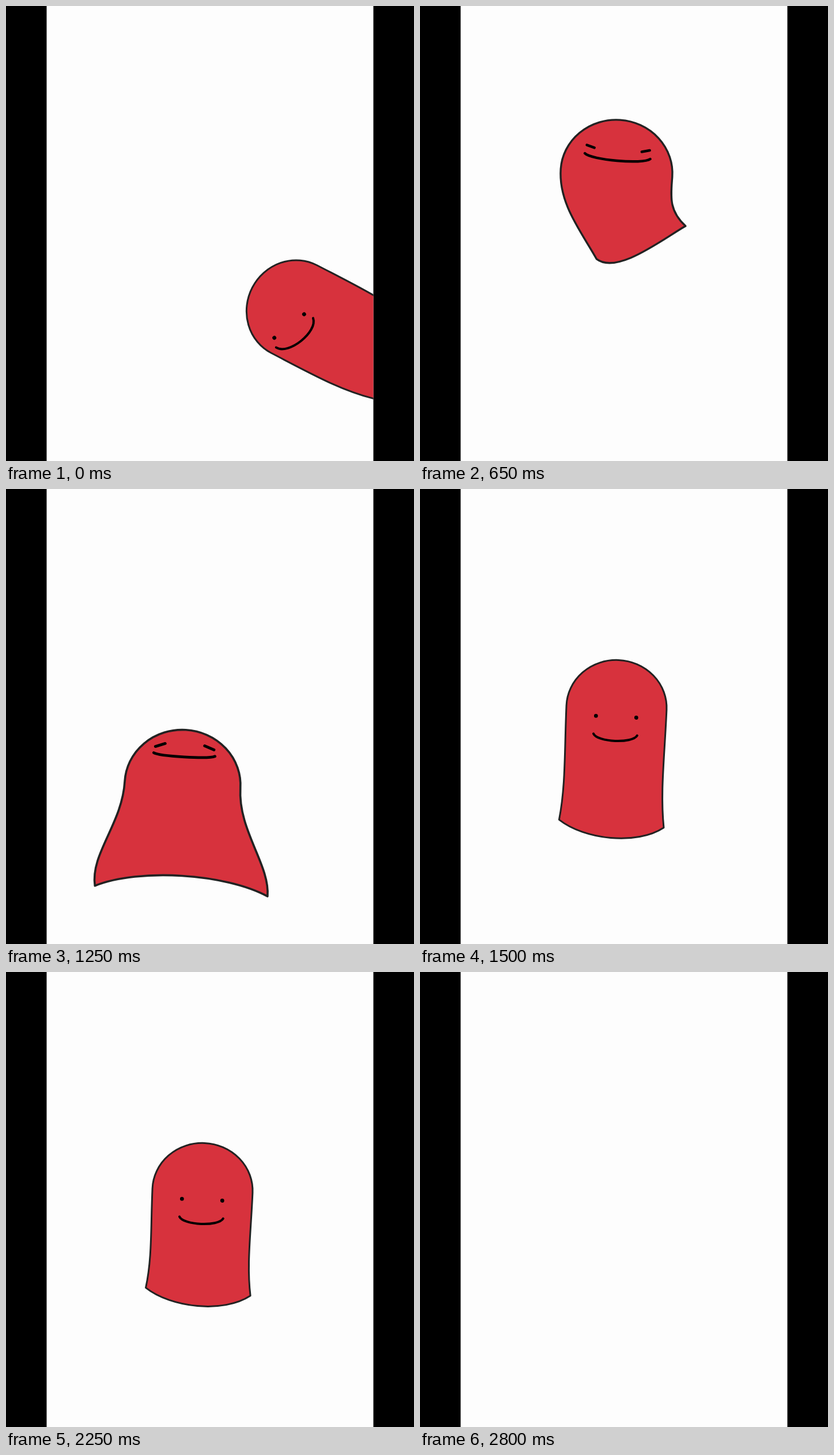
Animation of 708x791 px, one loop 2.85 s. Source, as an HTML page with a canvas:

```html
<!DOCTYPE html>
<html lang="en">
<head>
<meta charset="utf-8">
<title>Red blob</title>
<style>
  html, body { margin: 0; height: 100%; overflow: hidden; background: #000; }
  canvas { display: block; }
</style>
</head>
<body>
<canvas width="708" height="791"></canvas>
<script>
const ctx = document.querySelector('canvas').getContext('2d');
const LOOP = 2850, STEP = 50, GONE = 2800;
const EDGE = 70.5, PAPER = 567;

// Head centre, radius and tilt (degrees); the skirt's length, waist and hem;
// the face's offset and turn against the head; eye spacing, length and slant; the smile.
const stand = {
  x: 341, y: 380, r: 87, tilt: 2.5, ink: 4,
  len: 202, waist: 82, hem: 91, shift: 0, skew: 3, bulge: 33,
  faceX: 0, faceY: 16, turn: 0,
  eyes: 35, eyeLen: 0, slant: 0, gap: 31, smile: 38, depth: 11
};
const enter = { ...stand, x: 500, y: 527, r: 86, tilt: -62.5, len: 195, waist: 88, hem: 74, skew: 0, bulge: 40,
  faceX: -30, faceY: 6, turn: 24, eyes: 33, gap: 15, smile: 41, depth: 18 };
const hop = { ...stand, y: 290, r: 97, tilt: 4, ink: 4.5, len: 118, waist: 74, hem: 75, shift: 51, skew: -34, bulge: 25,
  faceY: -42, turn: 1, eyes: 48, eyeLen: 14, slant: 15, gap: 13, smile: 57, depth: 8 };
const drop = { ...stand, x: 311, y: 463, r: 103, tilt: 3.5, ink: 5, len: 150, waist: 170, hem: 161, shift: 10, skew: 0, bulge: -48,
  faceY: -82, eyes: 44, eyeLen: 21, slant: -24, gap: 11, smile: 56, depth: 3 };
const twirl = { ...stand, x: 340, y: 384, r: 86, tilt: 5, ink: 3, len: 133, waist: 95, hem: 138, shift: 5, skew: 4, bulge: 48,
  faceY: 12, gap: 20, smile: 42, depth: 13 };
const leap = { ...stand, x: 383, y: 330, r: 105, tilt: 33.7, ink: 5.5, len: 308, waist: 5, hem: 31, shift: 22, skew: -12, bulge: 50,
  faceX: 28, faceY: 132, turn: -12, eyes: 30, eyeLen: 24, slant: 44, gap: 19, smile: 30, depth: 57 };
const rest = { ...stand, len: 176 };

const keys = [
  [0, enter], [550, { ...hop, y: 293 }], [650, hop], [700, hop],
  [900, { ...drop, x: 322, y: 388, hem: 185 }], [1050, drop],
  [1200, { ...drop, x: 300, y: 540, len: 180 }],
  [1400, { ...stand, y: 374, len: 210 }], [1500, stand], [1600, stand],
  [1650, rest], [1750, rest],
  [1850, { ...twirl, hem: 225, len: 118 }], [1950, { ...twirl, hem: 215, skew: -40 }],
  [2050, twirl], [2150, { ...twirl, hem: 90, len: 160 }], [2250, rest], [2350, rest],
  [2500, { ...twirl, x: 285, y: 450, hem: 200, ink: 4 }],
  [2600, leap], [2650, { ...leap, x: 423, y: 240 }], [GONE, { ...leap, x: 680, y: -310 }]
];

function poseAt(t) {
  const i = keys.findIndex(key => key[0] > t);
  const [t0, from] = keys[i - 1], [t1, to] = keys[i];
  const u = (t - t0) / (t1 - t0), k = u * u * (3 - 2 * u);
  return Object.fromEntries(Object.keys(from).map(name => [name, from[name] + (to[name] - from[name]) * k]));
}

const radians = degrees => degrees * Math.PI / 180;

function drawBody({ r, len, waist, hem, shift, skew, bulge, ink }) {
  const left = len - skew, right = len + skew, pull = shift * .4;
  ctx.beginPath();
  ctx.moveTo(shift - hem, left);
  ctx.bezierCurveTo(pull - waist, left * .7, -r, left * .4, -r, 0);
  ctx.ellipse(0, 0, r, r * .95, 0, Math.PI, 2 * Math.PI);
  ctx.bezierCurveTo(r, right * .4, pull + waist, right * .7, shift + hem, right);
  ctx.bezierCurveTo(shift + hem * .5, right + bulge, shift - hem * .5, left + bulge, shift - hem, left);
  ctx.closePath();
  ctx.fillStyle = '#d7323d';
  ctx.fill();
  ctx.strokeStyle = '#222';
  ctx.lineWidth = ink * .75;
  ctx.stroke();
}

function drawFace({ eyes, eyeLen, slant, gap, smile, depth, ink }) {
  const dx = eyeLen / 2 * Math.cos(radians(slant)), dy = eyeLen / 2 * Math.sin(radians(slant));
  ctx.strokeStyle = '#000';
  ctx.lineWidth = ink * Math.max(1, 1.7 - eyeLen * .05);
  ctx.beginPath();
  for (const side of [-1, 1]) {
    ctx.moveTo(side * (eyes + dx), -dy);
    ctx.lineTo(side * (eyes - dx), dy);
  }
  ctx.stroke();
  ctx.lineWidth = ink;
  ctx.beginPath();
  ctx.moveTo(-smile, gap);
  ctx.bezierCurveTo(-smile * .8, gap + depth * 4 / 3, smile * .8, gap + depth * 4 / 3, smile, gap);
  ctx.stroke();
}

function drawBlob(pose) {
  ctx.translate(pose.x, pose.y);
  ctx.rotate(radians(pose.tilt));
  drawBody(pose);
  ctx.translate(pose.faceX, pose.faceY);
  ctx.rotate(radians(pose.turn));
  drawFace(pose);
}

function draw(now) {
  const t = Math.floor(now % LOOP / STEP) * STEP;
  ctx.fillStyle = '#000';
  ctx.fillRect(0, 0, 708, 791);
  ctx.save();
  ctx.fillStyle = '#fdfdfd';
  ctx.fillRect(EDGE, 0, PAPER, 791);
  ctx.beginPath();
  ctx.rect(EDGE, 0, PAPER, 791);
  ctx.clip();
  ctx.lineCap = ctx.lineJoin = 'round';
  if (t < GONE) drawBlob(poseAt(t));
  ctx.restore();
}

let start;
function tick(now) {
  start ??= now;
  draw(now - start);
  requestAnimationFrame(tick);
}
draw(0);
requestAnimationFrame(tick);
</script>
</body>
</html>
```
